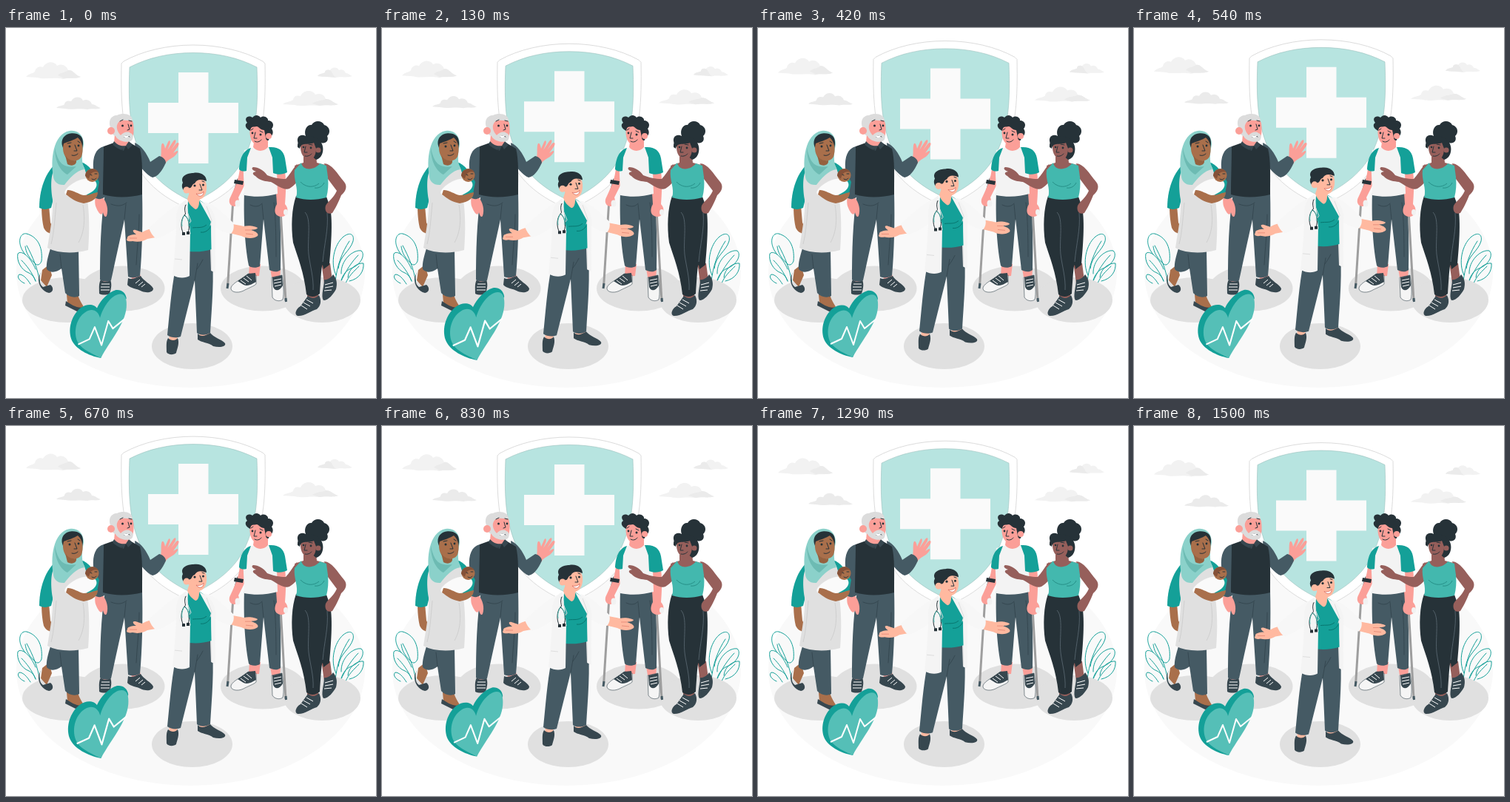
Write an HTML page that moves like this. It is 500 px wide and 500 px high and loops after 1.54 s.

```html
<!DOCTYPE html>
<html lang="en">
<head>
<meta charset="utf-8">
<title>Health care for everyone</title>
<style>
html, body { margin: 0; width: 100%; height: 100%; overflow: hidden; background: #fff; }
svg { display: block; width: 100vw; height: 100vh; }
.teal { fill: #14a098; } .mint { fill: #43b8ae; }
.navy { fill: #455a64; } .ink { fill: #263238; } .shoe { fill: #37474f; }
.grey { fill: #e0e0e0; } .pale { fill: #f3f3f3; }
.pink { fill: #fb9f98; } .peach { fill: #ffb9a0; }
.tan { fill: #a96f4b; } .brown { fill: #965f5b; }
.ln { fill: none; stroke: #263238; stroke-width: 1; stroke-linecap: round; stroke-linejoin: round; }
.lace { fill: none; stroke: #fff; stroke-width: 1; }
.leaf { fill: none; stroke: #14a098; stroke-width: 1; stroke-linecap: round; }
.fold { fill: none; stroke: #34464f; stroke-width: .9; stroke-linecap: round; }
</style>
</head>
<body>
<svg viewBox="0 0 500 500">
  <ellipse cx="249.500" cy="330" rx="235.500" ry="156" fill="#f9f9f9"/>

  <g id="clouds">
    <path fill="#f2f2f2" d="M27 66C31 61 36 62 39 59C40 53 46 51 50 53C54 45 65 44 69 51C75 47 82 51 84 57C91 56 92 63 101 66C94 69 84 67 77 69C65 66 51 70 42 67Z"/>
    <path fill="#ebebeb" d="M70 64C75 59 79 61 84 57C91 56 92 63 101 66C94 69 86 67 78 68Z"/>
    <path fill="#ebebeb" d="M68 108C72 104 76 106 79 103C80 98 85 98 88 99C92 92 101 92 104 98C110 95 115 99 116 103C121 103 123 107 128 108C122 111 116 108 110 110C99 108 88 111 80 109Z"/>
    <path fill="#f2f2f2" d="M421 65C424 61 428 62 431 60C431 56 436 56 438 57C440 53 447 52 450 57C455 55 458 58 459 61C463 61 465 64 468 65C460 68 451 65 446 67C438 65 430 67 421 65Z"/>
    <path fill="#ebebeb" d="M421 65C424 61 428 62 431 60C431 56 436 56 438 57C442 60 441 64 446 67Z"/>
    <path fill="#f2f2f2" d="M374 103C379 99 384 100 388 97C389 91 394 91 398 92C402 83 414 83 418 90C425 87 431 91 432 96C440 96 441 101 449 103C441 106 432 103 424 105C411 103 399 107 390 104Z"/>
    <path fill="#ebebeb" d="M414 102C421 97 426 99 432 96C440 96 441 101 449 103C441 106 432 103 424 105Z"/>
  </g>

  <g id="shield">
    <path fill="#fff" stroke="#dcdcdc" d="M253 23C218 23 184 31 159 45L156 48C155 102 157 137 173 177C187 211 216 232 253 247C290 232 319 211 333 177C349 137 351 102 350 48L347 45C322 31 288 23 253 23Z"/>
    <path fill="#b7e4e0" stroke="#9bbfbc" stroke-width=".6" d="M253 33.500C221 33.500 192 40 167 53C165 104 167 137 182 171C195 201 223 222 253 235C283 222 311 201 324 171C339 137 341 104 339 53C314 40 285 33.500 253 33.500Z"/>
    <path fill="#fafafa" d="M233 60H273.500V101H314V142H273.500V183H233V142H192V101H233Z"/>
  </g>

  <g class="leaf">
    <path d="M46 345C43 325 36 309 28 294M26 306C14 292 18 276 28 278C42 282 50 295 48 315C45 322 41 321 37 316C30 309 27 303 26 295M40 342C35 330 28 321 21 314M40 326C32 307 20 300 16 305C14 314 20 327 31 331C35 333 38 336 40 342M33 346C28 338 23 333 18 333C14 336 18 342 25 345"/>
    <path d="M445 343C447 322 454 303 464 288M446 334C438 318 443 293 456 282C465 275 471 279 469 288C465 302 451 307 449 325M452 344C459 328 468 315 476 307M453 332C452 314 469 299 480 301C486 306 480 320 466 325C457 329 454 337 452 344M459 345C463 335 470 329 477 322M462 337C463 324 476 317 483 318C484 328 478 339 464 342"/>
  </g>

  <g class="grey">
    <ellipse cx="83" cy="367.500" rx="61" ry="30.500"/>
    <ellipse cx="158" cy="352" rx="56.500" ry="30.500"/>
    <ellipse cx="347" cy="352" rx="57" ry="30.500"/>
    <ellipse cx="427" cy="367.500" rx="52" ry="30.500"/>
    <ellipse cx="251.500" cy="430" rx="54.500" ry="31"/>
  </g>

  <!-- bearded man -->
  <g>
    <path class="pink" d="M128 341H140L139 352H129ZM168 331L180 329L184 343L171 344Z"/>
    <path class="shoe" d="M128 340C132 344 137 344 141 340C144 348 141 355 140 359C136 361 130 361 126 359C126 351 125 346 128 340ZM165 338C171 341 177 336 182 335C186 342 196 346 199 352C199 358 189 358 184 356C177 352 168 352 164 347Z"/>
    <path class="lace" d="M129 346H140M128 350H140M128 354H140M175 345L181 340M179 348L185 343M183 350L188 346"/>
    <path class="navy" d="M134 223H184C185 261 184 302 181 335C175 338 169 338 165 336L160 259C153 290 147 318 142 341C137 344 131 343 127 340C127 302 128 260 134 223Z"/>
    <path class="fold" d="M160 258L162 238M142 238C152 242 158 240 163 236M180 252C180 274 177 300 176 320"/>
    <path class="pink" d="M120 227L131 229C136 236 139 245 136 254C134 257 132 253 131 249C129 255 125 250 122 243C119 237 121 232 120 227Z"/>
    <path class="navy" d="M132 160C121 163 117 174 118 190C118 205 119 218 120 229C124 232 129 232 134 228L137 180Z"/>
    <path class="pink" d="M207 180C211 173 209 166 210 159C211 153 214 156 215 163L219 154C221 150 223 153 221 158L218 165L226 153C229 149 231 152 228 157L223 165L230 156C234 153 235 157 231 162L226 169L231 166C234 166 231 170 228 173C223 177 218 178 215 184Z"/>
    <path class="navy" d="M174 155C183 159 190 169 195 181L207 173C212 174 216 178 216 182C211 193 205 201 198 202C190 199 181 187 176 180Z"/>
    <path class="ink" d="M146 155L132 160C132 180 131 205 131 225C148 230 168 229 184 225C184 201 185 178 181 163L166 154Z"/>
    <path class="pink" d="M147 143L166 145V157C161 162 151 162 146 155Z"/>
    <path class="shoe" d="M146 153C151 159 157 160 162 159L159 166C153 164 147 161 144 157ZM166 153L171 158L165 164L162 159Z"/>
    <path class="pink" d="M147 127C150 119 171 119 172 129C174 145 171 154 161 154C149 154 145 142 147 127Z"/>
    <path fill="#dcdcdc" d="M142 136C137 126 142 118 150 118C158 114 171 116 171 125C164 126 155 122 151 129C148 134 151 141 155 145C158 141 165 139 168 142C172 143 173 148 170 152C164 156 151 153 148 146C144 145 142 141 142 136Z"/>
    <circle class="pink" cx="142" cy="139" r="5"/>
    <path class="ln" d="M154 126L158 124M166 125L170 126M165 130L167 137L164 138M160 147C163 145 166 146 167 147"/>
    <circle class="ink" cx="157.500" cy="132" r="1.500"/><circle class="ink" cx="169" cy="132" r="1.400"/>
    <path fill="#fff" d="M159 146L166 145C165 149 161 149 159 146Z"/>
    <path class="ln" stroke="#455a64" d="M157 164V226"/>
  </g>

  <!-- mother and baby -->
  <g>
    <path class="tan" d="M49 327L58 320L62 334L55 350L47 341ZM82 360L97 360C99 368 104 374 106 379C98 383 91 377 83 372Z"/>
    <path class="shoe" d="M47 330C44 338 45 347 50 350L60 347C65 351 64 357 58 358C49 356 43 347 44 337ZM81 369C88 374 98 380 105 377C109 382 103 387 96 383L80 375Z"/>
    <path class="navy" d="M60 298C57 308 54 318 55 326C61 332 68 330 75 325L80 358C85 364 94 365 99 362L98 299Z"/>
    <path class="fold" d="M75 325L73 306"/>
    <path class="tan" d="M48 239C48 251 49 262 51 270C54 276 58 277 61 278C65 275 63 268 60 263L58 240Z"/>
    <path class="teal" d="M71 181C57 189 45 213 45 243C51 246 56 245 61 243L67 219Z"/>
    <path class="teal" d="M101 181C112 184 119 195 126 208L122 230L103 226Z"/>
    <path class="grey" d="M69 187C60 193 60 214 63 232C64 254 59 276 56 297C70 305 94 305 111 300C113 275 113 250 109 225C111 206 109 192 102 182Z"/>
    <path fill="none" stroke="#cfcfcf" d="M68 236C66 258 65 276 61 292M104 239C108 264 104 279 98 290"/>
    <path fill="#8bd1ca" d="M86 139C98 137 105 146 105 157C103 169 101 178 106 191C94 193 86 203 79 212C70 213 64 207 64 200C60 180 63 143 86 139Z"/>
    <path class="ink" d="M76 159C73 145 86 140 96 143C105 146 105 155 103 163L98 150C91 153 82 153 78 165Z"/>
    <path class="tan" d="M78 156C83 154 93 151 97 148C104 154 105 165 102 174C98 181 87 181 82 176C77 171 76 162 78 156Z"/>
    <path fill="#95613f" d="M80 172L83 184C90 188 96 184 95 179C88 180 83 177 80 172Z"/>
    <path class="ln" d="M83 156L88 155M97 153L100 155M93 158L96 166L92 166M89 172C92 173 95 172 97 170"/>
    <circle class="ink" cx="86" cy="160" r="1.500"/><circle class="ink" cx="98" cy="159" r="1.400"/>
    <path fill="#6dbbb3" d="M66 162C70 180 75 190 95 187L83 198C74 194 66 181 66 162Z"/>
    <path fill="#fafafa" d="M82 217C91 208 103 202 115 204C125 207 124 215 118 220C106 229 91 231 82 226C78 224 79 220 82 217Z"/>
    <circle class="tan" cx="116.500" cy="199" r="9"/>
    <path fill="#855138" d="M107 200C107 190 120 187 125 195C117 192 113 198 112 204Z"/>
    <path class="ln" d="M114 198L116 199M120 197L123 197M116 204C119 206 121 204 122 203"/>
    <path class="tan" d="M83 219C92 219 98 225 105 226C114 226 120 222 124 222C124 230 117 235 105 237C94 235 88 230 81 225Z"/>
  </g>

  <!-- young man with crutches -->
  <g>
    <path fill="none" stroke="#9e9e9e" stroke-width="3" d="M307 231L299.500 350M371 246L378 369"/>
    <path fill="none" stroke="#455a64" stroke-width="3" d="M314 204L305 236M300 345L299 352M378 365L378.500 370M371 205L375 248"/>
    <path class="pink" d="M329 319H344L342 335L328 336ZM357 325H371L370 343H360Z"/>
    <path fill="#f5f5f5" stroke="#37474f" stroke-width=".6" d="M328 332C320 339 306 344 304 351C303 357 313 359 321 355C326 352 335 349 338 346V334ZM359 337L373 334C375 346 376 359 374 367C370 370 363 369 360 364Z"/>
    <path class="shoe" d="M327 332L337 331L338 343C332 346 327 350 321 347L313 342ZM360 337L373 334L374 348C370 355 364 357 361 350Z"/>
    <path class="lace" d="M317 341L324 346M321 338L328 343M325 335L332 341M362 341L372 339M362 345L372 343M363 349L372 347"/>
    <path class="navy" d="M322 222H366C371 247 372 283 371 327C366 331 360 329 356 327L348 258L343 322C338 325 330 324 328 321C322 290 321 250 322 222Z"/>
    <path class="fold" d="M348 259L346 238M330 239C336 242 342 242 346 237M362 236C364 251 365 276 365 309"/>
    <path class="pink" d="M316 189C315 203 310 214 304 227C299 235 303 241 309 241C314 239 316 234 314 229L323 211L325 190Z"/>
    <path class="pink" d="M363 192L377 194C379 210 378 225 377 238C383 244 381 254 373 255C363 255 361 247 366 238Z"/>
    <path class="pale" d="M333 162L322 165C319 181 322 207 322 226C337 229 353 228 367 224L365 163L351 160Z"/>
    <path class="teal" d="M331 162C319 166 316 178 315 191C318 194 321 194 325 193L326 175ZM355 161C368 160 375 165 377 176L380 195C374 198 368 199 361 196L360 175Z"/>
    <path class="ink" d="M309 205L321 207L320 212L308 210Z"/>
    <ellipse cx="313" cy="237" rx="3.500" ry="4.500" fill="#f2f2f2"/><ellipse cx="378" cy="249" rx="3" ry="4" fill="#f2f2f2"/>
    <path class="pink" d="M336 148L354 147V161C348 168 338 167 334 161Z"/>
    <path class="pink" d="M330 133C335 126 351 125 355 134C358 148 352 160 343 159C332 158 328 148 330 133Z"/>
    <path class="ink" d="M330 139C325 137 321 131 326 128C321 122 327 117 333 121C337 116 342 118 344 121C349 117 355 122 354 125C361 125 363 132 359 136C363 142 359 147 355 149C357 153 351 153 351 148L349 138C344 138 341 133 339 133C334 134 331 132 330 139Z"/>
    <circle class="pink" cx="355" cy="146" r="4"/>
    <path class="ln" d="M331 138L334 136M343 139L347 141M337 141L335 149L339 149M336 153C339 155 343 154 345 151"/>
    <circle class="ink" cx="333" cy="142" r="1.400"/><circle class="ink" cx="344" cy="144" r="1.500"/>
  </g>

  <!-- woman in sportswear -->
  <g>
    <path class="brown" d="M407 340L422 339V367L407 371ZM426 316L438 318L441 341L430 345Z"/>
    <path class="shoe" d="M408 362C414 367 419 365 423 361C427 369 425 376 420 380C412 382 403 390 394 389C389 387 392 379 398 376ZM430 340C434 341 440 337 442 333C447 339 448 345 446 353C442 360 436 368 429 368C425 363 430 349 430 340Z"/>
    <path class="lace" d="M399 375L407 380M402 371L411 376M406 367L415 372M431 347L442 344M431 351L442 349M430 355L440 354"/>
    <path class="ink" d="M392 227C386 244 385 268 388 290C394 309 403 331 406 360C412 365 420 363 424 359C426 330 427 310 429 326L437 320C439 296 442 263 438 242L433 228Z"/>
    <path fill="none" stroke="#526069" d="M404 249C413 258 407 286 409 306C411 322 416 338 415 354M434 250C436 272 430 292 428 316"/>
    <path class="brown" d="M393 184C386 193 382 200 378 204C370 204 360 202 353 199C348 192 341 188 334 188C330 190 335 193 338 194C332 195 333 198 337 200C343 207 352 207 358 208C367 213 376 220 383 217C390 213 397 204 402 197Z"/>
    <path class="brown" d="M430 183C441 184 447 196 457 208C462 214 459 221 453 226C450 234 445 244 441 250C434 253 430 247 432 240C436 233 442 231 447 220L435 204Z"/>
    <path class="brown" d="M402 174L419 172L420 182L435 186L428 199H393L390 186L402 182Z"/>
    <path class="mint" d="M399 182C401 194 418 192 424 183L433 186C434 197 438 210 433 229C419 233 404 233 392 229C396 217 388 205 390 192Z"/>
    <path fill="none" stroke="#268f87" d="M398 208C407 217 417 215 423 210M417 216C422 217 428 214 430 209"/>
    <path class="ink" d="M405 146C402 138 407 130 413 131C417 124 427 125 430 131C438 133 439 142 434 146C437 153 431 157 426 155C431 163 428 176 419 178L396 158C390 148 398 142 405 146Z"/>
    <path class="brown" d="M399 156C404 150 413 149 418 155C421 167 417 178 410 178C400 177 396 164 399 156Z"/>
    <path class="ink" d="M394 161C393 148 407 143 418 148C427 151 426 162 421 168L416 155C408 159 399 153 397 163Z"/>
    <circle class="brown" cx="422" cy="165" r="3.500"/>
    <path class="ln" d="M400 157L403 156M409 157L414 158M405 160L403 168L407 168M404 173C408 174 411 172 413 170"/>
    <circle class="ink" cx="402" cy="161" r="1.300"/><circle class="ink" cx="412" cy="162" r="1.400"/>
  </g>

  <g id="doctor">
    <path class="peach" d="M221 412H232L231 427H220ZM260 407H274L276 418H262Z"/>
    <path class="shoe" d="M219 419C223 423 229 423 232 419C235 426 231 434 230 439C227 442 219 442 217 438C217 430 216 424 219 419ZM259 413C263 418 270 416 276 412C280 418 292 421 296 426C298 431 288 432 280 430C274 425 264 425 259 421Z"/>
    <path class="navy" d="M229 325C223 355 221 387 218 415C223 419 231 419 236 417L255 341L258 412C263 416 271 415 276 412C278 377 282 338 278 298H246Z"/>
    <path class="fold" d="M255 341L259 318M266 313C263 319 260 323 258 326"/>
    <path class="peach" d="M201 271C194 271 187 274 184 276L175 273C170 272 171 276 176 279C169 279 163 281 164 284C161 288 166 289 171 288C179 290 186 288 191 285L202 283ZM302 265C310 265 316 267 321 268C329 266 337 268 340 270C339 273 333 272 331 273C338 275 342 278 340 281C335 285 325 285 318 281L302 277Z"/>
    <path fill="none" stroke="#e78f7b" d="M167 284H177M331 273L323 273M334 279L324 278"/>
    <path fill="#f7f7f7" d="M241 235C223 241 208 258 193 270C195 276 198 281 203 285C214 281 225 275 234 267L247 259ZM268 235C282 238 294 251 307 263C309 269 307 275 304 278C291 276 281 270 275 260Z"/>
    <path class="grey" d="M274 245C281 263 283 302 282 330L277 328L275 270Z"/>
    <path class="teal" d="M246 233C244 259 247 283 248 302C258 303 269 302 278 299C278 282 276 270 279 257C278 246 271 238 262 233Z"/>
    <path class="peach" d="M248 222L263 227L261 235C261 242 258 245 256 245C250 241 246 236 245 231Z"/>
    <path fill="none" stroke="#08766f" d="M252 270C260 269 265 271 271 266M263 276C269 277 274 273 276 269"/>
    <path fill="#f4f4f4" d="M244 232C234 237 229 246 230 263C230 287 227 314 225 334C234 339 243 338 248 335L249 275ZM261 233L272 239C281 246 285 260 283 270C283 292 282 314 283 331L278 328L277 262Z"/>
    <path fill="none" stroke="#dedede" d="M241 239L250 261L246 266L249 278M271 241L278 260L276 267M228 312L238 313"/>
    <path class="ln" stroke="#455a64" stroke-width="1.400" d="M243 239C239 247 245 251 241 253C236 259 236 270 239 276M241 253C248 257 249 269 246 276"/>
    <path fill="none" stroke="#43b8ae" d="M241 253C238 258 237 263 238 268M242 253C246 257 247 262 247 268"/>
    <path class="ink" d="M238 276H242V280H238ZM244 275H248V279H244Z"/>
    <path class="peach" d="M246 211C252 202 265 201 270 208C273 218 270 231 260 232C249 231 244 222 246 211Z"/>
    <path class="ink" d="M245 222C239 221 236 214 239 209C235 200 245 196 253 196C264 194 271 200 271 207C265 205 259 203 255 210C251 211 251 217 248 216Z"/>
    <circle class="peach" cx="244" cy="219" r="4.500"/>
    <path class="ln" d="M252 209L256 207M265 207L268 208M262 211L265 219L261 219"/>
    <path d="M257 224C261 225 265 224 267 221C267 228 261 229 257 224Z" fill="#fff" stroke="#d45c50" stroke-width=".7"/>
    <circle class="ink" cx="255" cy="213" r="1.600"/><circle class="ink" cx="266.500" cy="212" r="1.500"/>
  </g>

  <g id="heart">
    <path class="teal" d="M128 445C112 442 94 433 89 420C84 405 90 388 101 379C110 372 120 374 123 379C128 368 138 358 148 355C155 354 161 358 162 366L150 390Z"/>
    <path fill="#55bfb7" d="M128 445C120 441 103 434 98 425C91 412 95 392 108 384C117 378 125 383 127 392C131 377 141 364 150 361C160 358 163 366 162 378C160 400 142 420 128 445Z"/>
    <path fill="none" stroke="#fff" stroke-width="2" stroke-linejoin="round" d="M98 427L113 420L120 404L129 428L138 396L144 406L160 393"/>
  </g>
</svg>

<script>
const LOOP = 1540, LIFT = 9.4, TOP = 710, BEAT = 200;
const el = id => document.getElementById(id);
const floats = ["clouds", "shield", "doctor"].map(el);
const heart = el("heart");

// linear pulse of half width BEAT around a peak, wrapped over the loop
const pulse = (t, peak) => {
  const d = Math.abs(t - peak);
  return Math.max(0, 1 - Math.min(d, LOOP - d) / BEAT);
};

function draw(t) {
  const rise = t < TOP ? t / TOP : (LOOP - t) / (LOOP - TOP);
  const size = 1 + 0.1 * (pulse(t, 160) + pulse(t, 697));
  for (const f of floats) f.setAttribute("transform", `translate(0 ${-LIFT * rise})`);
  heart.setAttribute("transform", `translate(124.5 400) scale(${size}) translate(-124.5 -400)`);
}

const start = performance.now();
function tick(now) {
  draw(Math.max(0, now - start) % LOOP);
  requestAnimationFrame(tick);
}
draw(0);
requestAnimationFrame(tick);
</script>
</body>
</html>
```
